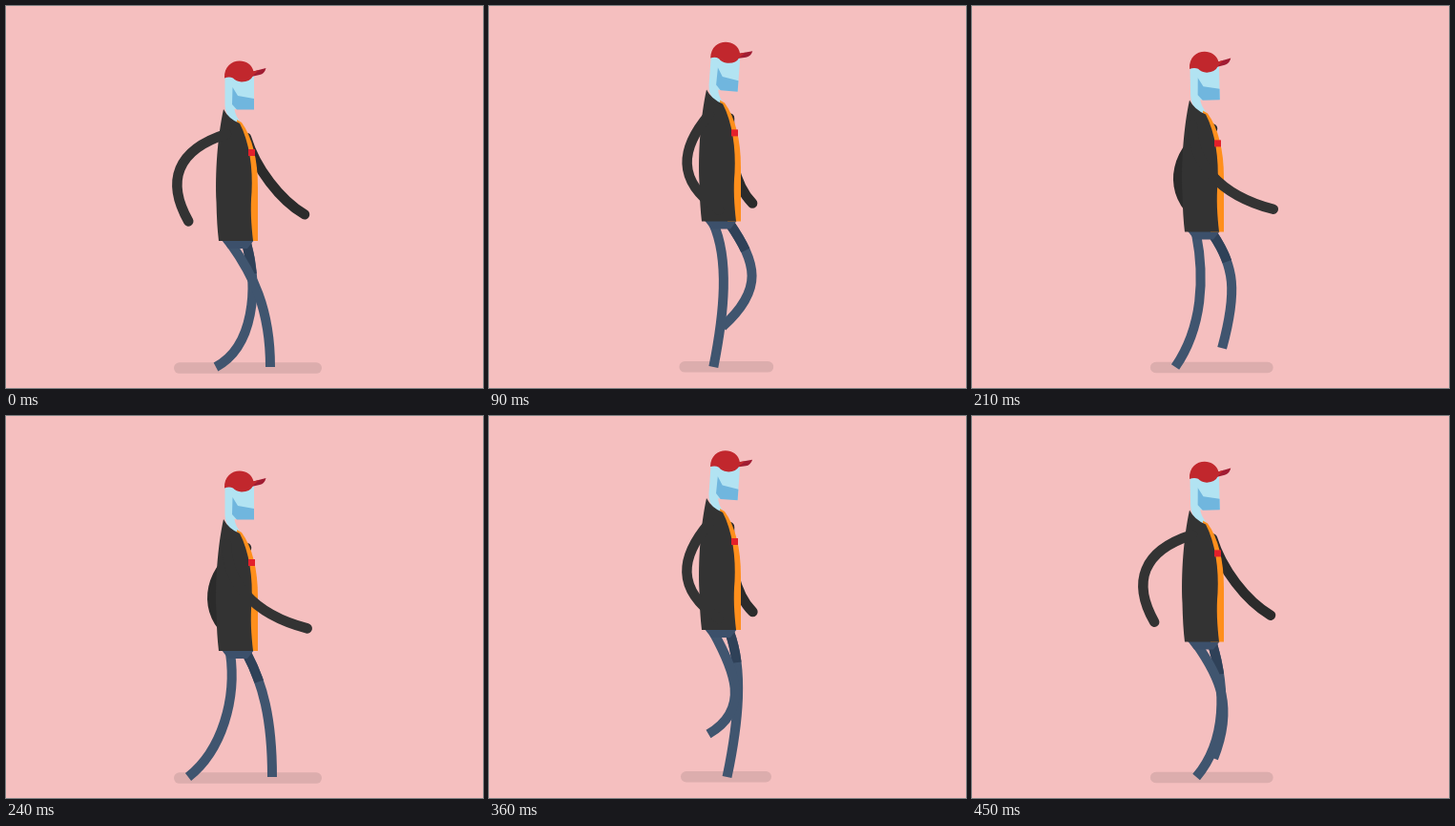
Animation of 500 by 400 pixels, one loop 480 ms. Source, as an HTML page:

```html
<!DOCTYPE html>
<html lang="en">
<head>
<meta charset="utf-8">
<title>Walk cycle</title>
<style>
  html, body { margin: 0; width: 100%; height: 100%; overflow: hidden; background: #f5bfbf; }
  svg { display: block; width: 500px; height: 400px; }
  .limb { fill: none; stroke-width: 10; }
  .arm { stroke-linecap: round; stroke-width: 10.5; }
  .leg { stroke: #40556f; }
</style>
</head>
<body>
<svg viewBox="0 0 500 400">
  <rect id="shadow" height="11.5" rx="5.7" fill="#dcadad"/>
  <path id="backArm" class="limb arm" stroke="#2b2b2b"/>
  <path id="backLeg" class="limb leg"/>
  <path id="thigh" class="limb" stroke="#2f4158" stroke-dasharray="33 999"/>
  <path id="frontLeg" class="limb leg"/>
  <g id="body">
    <path d="M226 245H260L253 254H233Z" fill="#3c506b"/>
    <g id="head">
      <path d="M229.5 73H260V108H239.5Q240 114 246 122L238 121Q229.500 114 229.500 104Z" fill="#b2e3f2"/>
      <path d="M237.500 85L243 94L260 97V108.500H242L237 103Z" fill="#70b6de"/>
      <path d="M257 69L272.500 65Q271 71 266 72L257 74Z" fill="#a01c32"/>
      <path d="M229 75.500C228 53.500 256 52.500 259.500 68.500L265 67L259 73Q256 79.500 247 79.500Q241 79 238 75.500Q234 73.500 229 75.500Z" fill="#c1272d"/>
    </g>
    <path d="M242 119L247 122C258 137 264 160 264 190V246H250Z" fill="#ff8f1c"/>
    <path d="M228 108C222 135 219 175 220.500 205Q221 230 223 246H259C257 228 256 212 257.500 195C259 170 255 142 245 123Q233 118 228 108Z" fill="#333"/>
    <rect x="254" y="150" width="7" height="7" fill="#e3202b"/>
  </g>
  <path id="frontArm" class="limb arm" stroke="#333"/>
</svg>
<script>
const LOOP = 480, TICK = 30, GROUND = 378, TAU = 2 * Math.PI;
const $ = id => document.getElementById(id);
const mix = (a, b, k) => a + (b - a) * k;

// Angles in degrees; tuck straightens the shin in mid swing.
const legs = {
  frontLeg: { hip: 235, foot: 234, reach: 43, lean: 8, knee: 7, roll: 52, tuck: -8, phase: 0 },
  backLeg: { hip: 252, foot: 249.5, reach: 29.5, lean: 2, knee: 15, roll: 62, tuck: 15, phase: 0.5 }
};

// Handles and hand of the arm when swung back, passing and swung forward.
const arms = {
  frontArm: {
    root: [231, 134], side: -1,
    back: [178, 150, 167, 183, 190, 225],
    mid: [206, 172, 204, 206, 253, 234],
    front: [232, 172, 258, 207, 317, 222]
  },
  backArm: {
    root: [252, 138], side: 1,
    back: [213, 157, 204, 200, 231, 225],
    mid: [246, 169, 249, 208, 268, 228],
    front: [262, 170, 288, 203, 314, 218]
  }
};

// u runs from 1 (foot ahead) to -1 (foot behind) on the ground, then back in the air.
function legPath(leg, p, dy) {
  const q = (p + leg.phase) % 1;
  const air = q < 0.5 ? 0 : 1;
  const u = air ? 4 * q - 3 : 1 - 4 * q;
  const lift = 1 - u * u, raise = air * lift;

  const hipY = 248 + dy;
  const footX = leg.foot + leg.reach * Math.sign(u) * Math.abs(u) ** 2.5 - 4 * raise;
  const footY = GROUND - 45 * raise;
  const kneeX = leg.hip + 15 + leg.lean * u + leg.knee * raise;
  const kneeY = hipY + 40 - 8 * u;

  const roll = air
    ? leg.roll * (1 - Math.max(0, u) ** 1.5)
    : leg.roll * Math.max(0, -u) ** 2 + 12 * lift;
  const angle = (roll - leg.tuck * raise) * TAU / 360;
  const shin = mix(62, 45, roll / leg.roll) + leg.knee * raise;
  const shinX = footX + shin * Math.sin(angle);
  const shinY = footY - shin * Math.cos(angle);

  return `M${leg.hip} ${hipY}C${kneeX} ${kneeY} ${shinX} ${shinY} ${footX} ${footY}`;
}

function armPath({ root: [x, y], side, back, mid, front }, p, dy) {
  const w = side * Math.cos(TAU * p + 0.2);
  const pts = mid.map((m, i) => {
    const bend = (front[i] + back[i]) / 2 - m;
    return m + (front[i] - back[i]) / 2 * w + bend * w * w + (i % 2 ? dy : 0);
  });
  return `M${x} ${y + dy}C${pts.join(' ')}`;
}

function render(now) {
  const p = Math.floor(now % LOOP / TICK) * TICK / LOOP;
  const step = 2 * p % 1;
  const rise = 1 - (1 - 2 * step) ** 2;
  const dy = -22 * rise;
  const tilt = 4 * rise + 2.5 * Math.sin(TAU * step) + 1.3 * Math.sin(2 * TAU * step);

  const shadow = $('shadow');
  shadow.setAttribute('x', 176 + 25 * rise);
  shadow.setAttribute('y', 373.3 - 1.3 * rise);
  shadow.setAttribute('width', 155 - 60 * rise);
  $('body').setAttribute('transform', `translate(0 ${dy})`);
  $('head').setAttribute('transform', `rotate(${tilt} 236 118)`);

  for (const id in legs) $(id).setAttribute('d', legPath(legs[id], p, dy));
  for (const id in arms) $(id).setAttribute('d', armPath(arms[id], p, dy));
  $('thigh').setAttribute('d', $('backLeg').getAttribute('d'));
}

function loop(now) {
  render(now);
  requestAnimationFrame(loop);
}
render(0);
requestAnimationFrame(loop);
</script>
</body>
</html>
```
